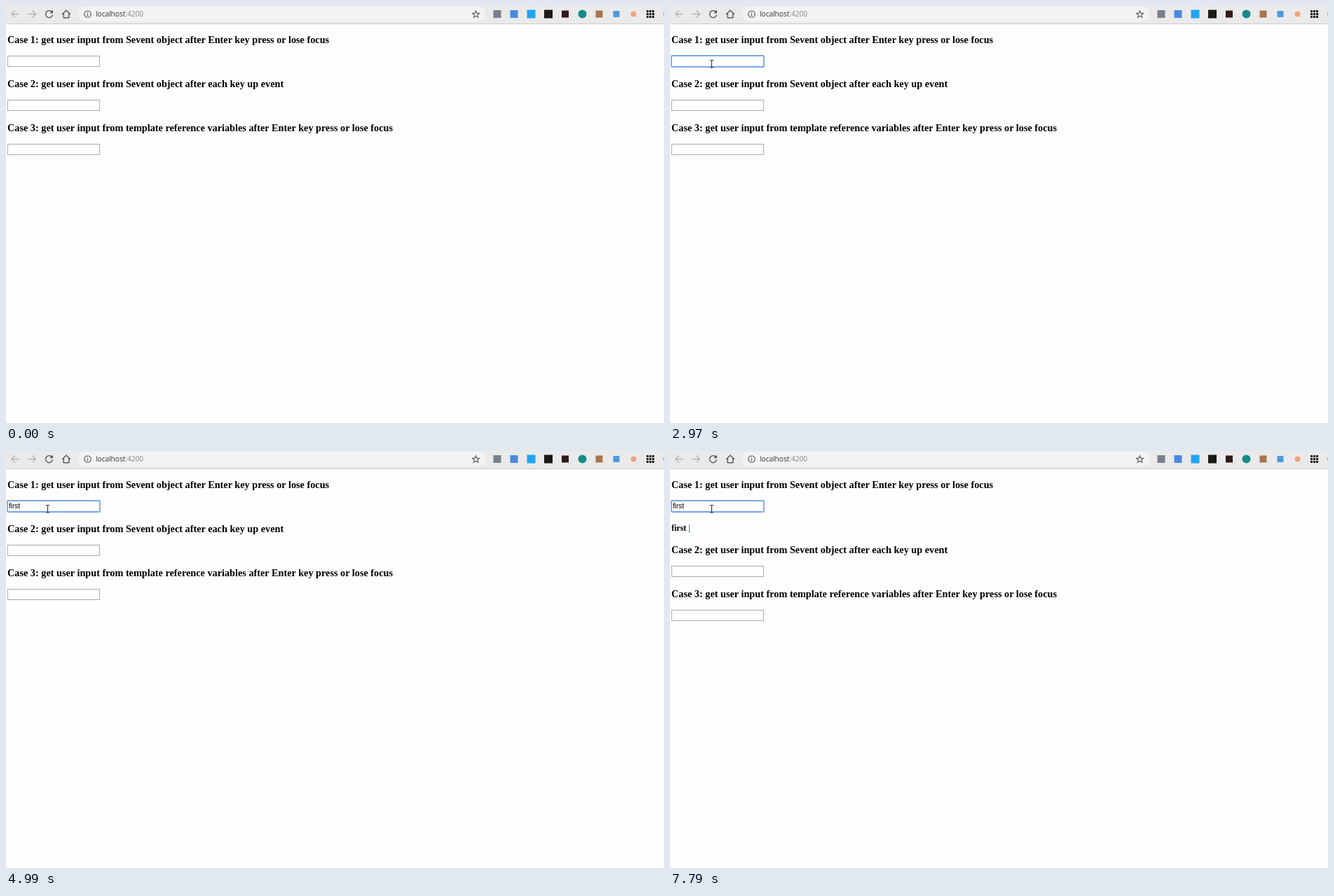
An HTML page for the animation above (8 s loop, 939 px wide and 596 px high).

```html
<!DOCTYPE html>
<html lang="en">
<head>
<meta charset="utf-8">
<title>Input cases</title>
<style>
  html, body { margin: 0; width: 100%; height: 100%; overflow: hidden; background: #fefefe; }
  #stage { position: relative; width: 100%; height: 100%; overflow: hidden; contain: strict; }
  svg { position: absolute; left: 0; top: 0; width: 100%; height: 100%; display: block; }
  .case { font: bold 14.25px "Liberation Serif", "Times New Roman", serif; }
  .echo { font: bold 12px "Liberation Serif", "Times New Roman", serif; }
  .typed { font: 10px "Liberation Sans", Arial, sans-serif; }
  .url { font: 10.1px "Open Sans", sans-serif; }
  .field { fill: #fff; stroke: #a9a9a9; }
  .icon { fill: none; stroke: #55585c; stroke-width: 1.4; }
  #keys {
    position: absolute; left: 469.5px; bottom: 0; transform: translateX(-50%);
    display: flex; gap: 13px; padding: 0 7px; overflow: hidden;
    background: #000; color: #fff; font: 600 22px/49px "Open Sans", sans-serif; white-space: nowrap;
  }
</style>
</head>
<body>
<div id="stage">
<svg viewBox="0 0 939 596">
  <rect width="939" height="25" fill="#eaeaeb"/>
  <rect y="25" width="939" height="1" fill="#cbcbcb"/>
  <rect x="103" y="1" width="581" height="21" rx="10.5" fill="#f3f3f4"/>

  <g class="icon">
    <path d="M18.500 11.500H8.500M13 6.500l-5 5 5 5" stroke="#b4b4b6"/>
    <path d="M32 11.500H42M37.500 6.500l5 5-5 5" stroke="#b4b4b6"/>
    <path d="M65.500 8.500a5 5 0 1 0 1 4"/>
    <path d="M67 5.500v4.800h-4.800z" fill="#55585c" stroke="none"/>
    <path d="M80 12l6-5.700 6 5.700M82.200 10.500v6.300h7.600v-6.300"/>
    <circle cx="116.500" cy="11.500" r="4.700" stroke-width="1.100"/>
    <path d="M116.500 11v3.300M116.500 8.600v1.300" stroke-width="1.200"/>
    <path id="star" stroke-width="1.100"/>
  </g>
  <text class="url" x="128" y="15" fill="#333">localhost<tspan fill="#858585">:4200</tspan></text>

  <g id="extensions"></g>

  <text class="case" x="2" y="53">Case 1: get user input from Sevent object after Enter key press or lose focus</text>
  <rect class="field" x="2.500" y="71.500" width="131" height="15"/>
  <rect id="ring" x="2" y="71" width="132" height="16" rx="1" fill="#fff" stroke="#78a6ea" stroke-width="1.800"/>
  <text id="typed" class="typed" x="4" y="82"></text>
  <rect id="caret" y="73" width="1" height="12"/>
  <text id="echo" class="echo" x="2" y="114">first <tspan fill="#24708c">|</tspan></text>

  <g id="lower">
    <text class="case" x="2" y="116">Case 2: get user input from Sevent object after each key up event</text>
    <rect class="field" x="2.500" y="134.500" width="131" height="15"/>
    <text class="case" x="2" y="179">Case 3: get user input from template reference variables after Enter key press or lose focus</text>
    <rect class="field" x="2.500" y="197.500" width="131" height="15"/>
  </g>

  <g id="pointer">
    <circle id="glow" cx="-1.500" r="9" fill="#ff0" opacity=".68"/>
    <path id="arrow" d="M0 0v16l3.700-3.500 2.500 5.900 2.500-1.100-2.500-5.700h5.100z" fill="#fff" stroke="#000" stroke-width=".9"/>
    <path id="beam" d="M-2.500-4.500h2l.5.500.5-.5h2M0-4v9.500M-2.500 6h2l.5-.5.5.5h2" fill="none" stroke="#333" stroke-width="1.100"/>
  </g>
</svg>
<div id="keys"></div>
</div>

<script>
const LOOP = 8000;
const $ = id => document.getElementById(id);
const show = (id, on) => { $(id).style.display = on ? "" : "none"; };

// Each table row is [start time, value...]; a row holds until the next one.
const typing = [[0, ""], [3290, "f"], [3360, "fi"], [3510, "fir"], [3740, "firs"], [3830, "first"], [4150, "first "]];
const caretX = [4, 7, 9, 12, 17, 20, 23];
const caretOn = [
  [0, 0], [1500, 1], [1950, 0], [2500, 1], [2970, 0], [3290, 1], [4610, 0],
  [5160, 1], [5690, 0], [6240, 1], [6700, 0], [7250, 1], [7790, 0]
];
// Pressed keys and the visible height of their panel.
const keyRows = [
  [0, ""], [3440, "f", 24], [3510, "f i", 33], [3740, "f i s", 38], [3830, "f i s t", 40],
  [4060, "f i s t", 45], [4150, "f i s t Space", 45], [4290, "i s t Space", 45],
  [4380, "s t Space", 45], [4610, "t Space", 45], [4690, "Space", 45], [4760, ""]
];
const glowOn = [[0, 1], [1500, 0], [7480, 1], [7630, 0]];
const settle = [[1170, 71, 84], [1270, 65, 83], [1340, 61, 82], [1410, 59, 82]];
const rowAt = (rows, t) => rows.findLast(row => row[0] <= t);

function pointerAt(t) {
  if (t >= 1170) return rowAt(settle, t).slice(1);
  const p = Math.floor((t - 390) / 78) / 10;
  const e = p * p * (3 - 2 * p);
  return [602 - 531 * e, 526 - 442 * e];
}

function drawToolbar() {
  const points = Array.from({ length: 10 }, (_, i) => {
    const r = i % 2 ? 2.3 : 5.3, a = i * Math.PI / 5 - Math.PI / 2;
    return `${670.5 + r * Math.cos(a)} ${12 + r * Math.sin(a)}`;
  });
  $("star").setAttribute("d", `M${points.join("L")}Z`);

  const square = (x, color, s = 11) =>
    `<rect x="${x - s / 2}" y="${11.5 - s / 2}" width="${s}" height="${s}" fill="${color}"/>`;
  const disc = (x, color, r) => `<circle cx="${x}" cy="11.500" r="${r}" fill="${color}"/>`;
  let marks = square(701, "#777f8a") + square(725, "#4a8be0") + square(749.5, "#23a4f2", 12)
    + square(774, "#1d1913", 12) + square(798, "#33191b", 10) + disc(822.5, "#148c88", 6)
    + square(846.5, "#a8754f", 10) + square(871, "#4b9be0", 9) + disc(895.5, "#f0a37c", 4) + disc(943, "#d98b72", 5);
  for (let i = 0; i < 9; i++)
    marks += `<rect x="${914 + i % 3 * 4}" y="${6 + Math.floor(i / 3) * 4}" width="3" height="3" fill="#111"/>`;
  $("extensions").innerHTML = marks;
}

let shownKeys = null;
function drawKeys(t) {
  const [, text, height] = rowAt(keyRows, t);
  show("keys", text);
  if (text !== shownKeys) {
    $("keys").innerHTML = text.split(" ").map(key => `<span>${key}</span>`).join("");
    shownKeys = text;
  }
  if (text) $("keys").style.height = height + "px";
}

function render(t) {
  const text = rowAt(typing, t)[1];
  $("typed").textContent = text;
  $("caret").setAttribute("x", caretX[text.length]);
  show("caret", rowAt(caretOn, t)[1]);
  show("ring", t >= 1500);

  const submitted = t >= 7400;
  show("echo", submitted);
  $("lower").setAttribute("transform", `translate(0 ${submitted ? 30 : 0})`);

  show("pointer", t >= 390);
  if (t >= 390) {
    const [x, y] = pointerAt(t);
    const overField = x < 134 && y >= 71 && y < 87;
    $("pointer").setAttribute("transform", `translate(${x + 0.5} ${y})`);
    show("arrow", !overField);
    show("beam", overField);
    show("glow", rowAt(glowOn, t)[1]);
  }
  drawKeys(t);
}

drawToolbar();
const begin = performance.now();
function tick() {
  render((performance.now() - begin) % LOOP);
  requestAnimationFrame(tick);
}
tick();
</script>
</body>
</html>
```
